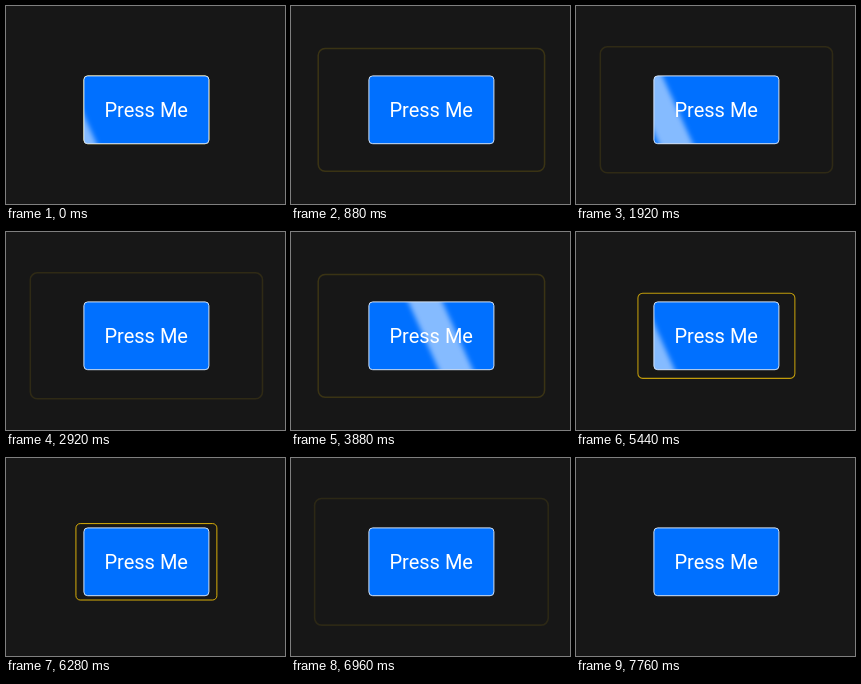
An HTML page that plays this animation: 279 px wide and 198 px high, repeating every 7800 ms.

```html
<!DOCTYPE html>
<html lang="en">
<head>
<meta charset="utf-8">
<title>Press Me</title>
<style>
  html, body { margin: 0; width: 100%; height: 100%; overflow: hidden; background: #171717; }
  svg { display: block; width: 279px; height: 198px; }
  text { font: 20px Roboto, Inter, sans-serif; fill: #fff; text-anchor: middle; }
  .ring { fill: none; stroke: #ffcd08; stroke-width: .85; }
  .face { fill: #0070ff; }
  .edge { fill: none; stroke: #d3e2f5; stroke-width: 1; }
  .shine { fill: #fff; fill-opacity: .52; }
</style>
</head>
<body>
<svg viewBox="0 0 279 198">
  <defs>
    <rect id="box" x="-62.5" y="-33.9" width="125" height="67.8" rx="3.8"/>
    <clipPath id="clip"><use href="#box"/></clipPath>
    <filter id="soft" x="-50%" y="-50%" width="200%" height="200%">
      <feGaussianBlur stdDeviation="2.8"/>
    </filter>
  </defs>
  <g transform="translate(140.4 103.8)">
    <use id="ring" class="ring" href="#box"/>
    <use class="face" href="#box"/>
    <g clip-path="url(#clip)">
      <g id="shine">
        <path class="shine" filter="url(#soft)" d="M4.5 44H-29.5L-69 -44H-35Z"/>
      </g>
    </g>
    <use class="edge" href="#box"/>
    <text x="-.2" y="7.3">Press Me</text>
  </g>
</svg>
<script>
  const LOOP = 7800;
  const PULSE = 1000, PULSES = 7;
  const SWEEP = 1800, SWEEP_LEAD = 50;

  // [time, value] points
  const growth = [[0, 0], [80, .012], [160, .055], [280, .144], [360, .21], [440, .289],
    [620, .54], [800, .8], [880, .92], [920, .974], [1000, 1]];
  const travel = [[0, -65], [50, -50], [90, -42], [170, -24], [330, 41], [480, 98], [600, 138]];

  const ring = document.getElementById('ring');
  const shine = document.getElementById('shine');

  function valueAt(points, t) {
    const i = points.findIndex(p => p[0] >= t);
    if (i < 0) return points[points.length - 1][1];
    if (i === 0) return points[0][1];
    const [t0, v0] = points[i - 1], [t1, v1] = points[i];
    return v0 + (v1 - v0) * (t - t0) / (t1 - t0);
  }

  function draw(t) {
    const p = valueAt(growth, t % PULSE);
    ring.setAttribute('transform', `scale(${1 + .88 * p})`);
    ring.setAttribute('opacity', t < PULSE * PULSES ? 1 - .92 * p : 0);

    const s = (t + SWEEP_LEAD) % SWEEP;
    shine.setAttribute('transform', `translate(${valueAt(travel, s)} 0)`);
    shine.setAttribute('visibility', s < 600 ? 'visible' : 'hidden');
  }

  const start = performance.now();
  function tick() {
    draw((performance.now() - start) % LOOP);
    requestAnimationFrame(tick);
  }
  tick();
</script>
</body>
</html>
```
